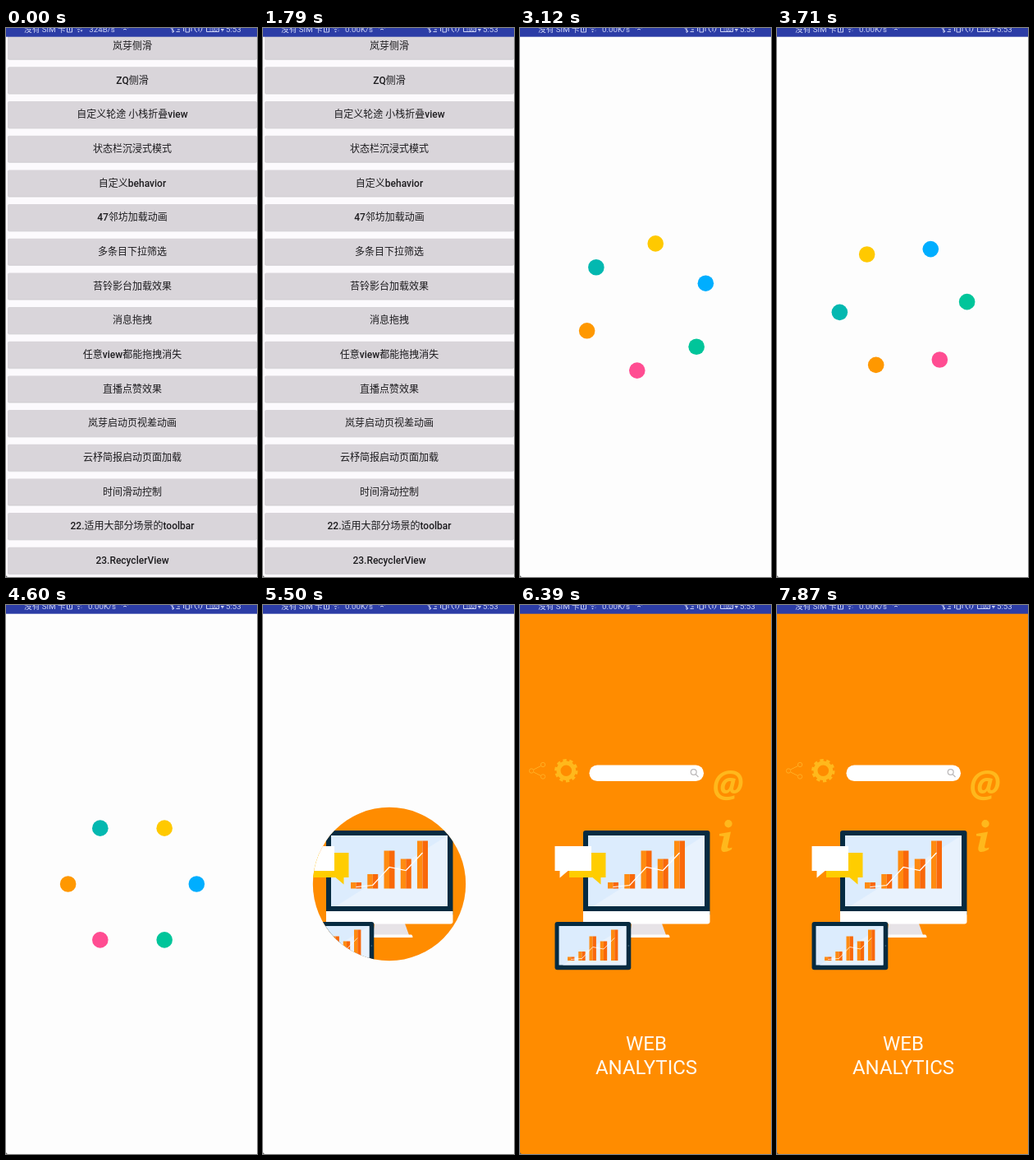
These frames come from a looping animation (306x667 px, 7970 ms). An HTML page:

```html
<!DOCTYPE html>
<html lang="zh-CN">
<head>
<meta charset="utf-8">
<title>Splash loader</title>
<style>
  html, body { margin: 0; width: 100%; height: 100%; overflow: hidden; background: #fcfafd; }
  svg { display: block; width: 306px; height: 667px; }
  text { font-family: Roboto, "Noto Sans CJK SC", "Noto Sans CJK", sans-serif; }
  #list text { font-size: 12px; font-weight: 500; fill: #1d1c1f; text-anchor: middle; }
  #status text { font-size: 9.7px; fill: #ccd2f4; }
  .title { font-size: 24px; fill: #fffaf0; text-anchor: middle; }
</style>
</head>
<body>
<svg viewBox="0 0 306 667">
  <defs>
    <clipPath id="hole"><circle id="holeCircle" cx="154" cy="339" r="0"/></clipPath>
  </defs>
  <rect width="306" height="667" fill="#fcfafd"/>
  <g id="list"></g>

  <g id="page">
    <rect y="10" width="306" height="657" fill="#fdfdfd"/>
    <g id="dots"></g>
    <g id="splash" clip-path="url(#hole)">
      <rect width="306" height="667" fill="#ff8c00"/>
      <g fill="none" stroke="#ffad22" stroke-width="1">
        <path d="M16.5 200L25.5 195.5M16.5 203L25.5 207.5"/>
        <circle cx="28" cy="194" r="2.7"/><circle cx="14" cy="201.5" r="2.7"/><circle cx="28" cy="208.5" r="2.7"/>
      </g>
      <g fill="none" stroke="#ffb81c">
        <circle cx="56.3" cy="201.2" r="9.3" stroke-width="5"/>
        <circle cx="56.3" cy="201.2" r="12.6" stroke-width="3.2" pathLength="20" stroke-dasharray="1.1 .9"/>
      </g>
      <rect x="84.5" y="194.5" width="139.5" height="19.5" rx="9.7" fill="#fff"/>
      <g fill="none" stroke="#bdbabb" stroke-width="1.3">
        <circle cx="211.7" cy="203" r="3.4"/><path d="M214.2 205.6L217.5 209"/>
      </g>
      <g fill="#ffb81c">
        <text x="253" y="233" text-anchor="middle" style="font:italic bold 44px 'Open Sans',sans-serif">@</text>
        <circle cx="254" cy="265.8" r="4.7"/>
        <path d="M243 278L257 275.5L253 294Q253 296.5 258.5 294.5L258 297Q252 300.5 248 300Q244.5 299 245.5 294L248.5 281L243 280.5Z"/>
      </g>

      <path d="M136 387H173L178 401H134Z" fill="#e7e3e7"/>
      <path d="M126 400.5H181Q182.500 401 182.500 404H126Z" fill="#fff"/>
      <rect x="77" y="274" width="154.500" height="104" rx="3" fill="#052b41"/>
      <path d="M77 372H231.500V384.500Q231.500 387.500 228.500 387.500H80Q77 387.500 77 384.500Z" fill="#fff"/>
      <rect x="83" y="280" width="142" height="86" fill="#dcecfd"/>
      <path d="M225 280V366H89Z" fill="#e8f2fd"/>
      <g id="bigChart"></g>

      <path d="M60 301H104.500V331H98.500V339.500L88.500 331H60Z" fill="#ffcd00"/>
      <path d="M42.500 293H87V323H58.500L48.500 331.500V323H42.500Z" fill="#fff"/>

      <rect x="42.500" y="385" width="92.800" height="58.300" rx="3" fill="#052b41"/>
      <rect x="47.500" y="390" width="82" height="47.500" fill="#dcecfd"/>
      <path d="M129.500 390V437.500H52Z" fill="#e8f2fd"/>
      <circle cx="132.400" cy="414" r="1" fill="#31536a"/>
      <g id="smallChart"></g>

      <text class="title" x="154" y="541">WEB</text>
      <text class="title" x="154" y="570">ANALYTICS</text>
    </g>
  </g>

  <g id="status">
    <rect width="306" height="10.700" fill="#2c3da6"/>
    <text x="22" y="5">没有 SIM 卡</text>
    <text id="speed" x="117" y="5" text-anchor="middle">324B/s</text>
    <text x="268" y="5">5:53</text>
    <g fill="none" stroke="#ccd2f4" stroke-width="1">
      <path d="M74.500 0V5H80.500V0M77.500 0V3.500"/>
      <path d="M85.500 0Q88.500 -2 91.500 0M87 2Q88.500 .8 90 2"/>
      <path d="M141 0Q145 -3 149 0M143 2Q145 .5 147 2"/>
      <path d="M200.500 0L205 4L203 5.500V-1M207.500 4.500H212M209 2H212"/>
      <path d="M216.500 0V4M219 0V5H223.500V0M226 0V4"/>
      <path d="M230 0Q230 4 233 5M235 0V4M239 0Q239 4 236.500 5"/>
      <path d="M244.500 0V4.500H259.500V0"/>
    </g>
    <text x="247" y="3.500" style="font-size:6.500px">100</text>
    <path d="M262 1H266L263.500 5V2.500H262Z" fill="#ccd2f4"/>
    <circle cx="88.500" cy="4.300" r=".9" fill="#ccd2f4"/>
    <path id="traffic" d="M90.500 2.500H93.500L92 4.800Z" fill="#ccd2f4"/>
  </g>
  <path d="M0 664.800Q.3 666.700 2.200 667H0Z" fill="#555"/>
</svg>

<script>
const LOOP = 7970;
const OPEN = 2680, STEP = 148.45;
const SPIN_START = 2555, SPIN = 671;       // three eased turns
const MERGE_START = SPIN_START + 3 * SPIN, MERGE = 697;
const EXPAND_START = MERGE_START + MERGE, EXPAND = 700;
const CX = 154, CY = 339, ORBIT = 77.9, REACH = 368;

const labels = [
  '岚芽侧滑', 'ZQ侧滑', '自定义轮途 小栈折叠view', '状态栏沉浸式模式',
  '自定义behavior', '47邻坊加载动画', '多条目下拉筛选', '苔铃影台加载效果',
  '消息拖拽', '任意view都能拖拽消失', '直播点赞效果', '岚芽启动页视差动画',
  '云杼简报启动页面加载', '时间滑动控制', '22.适用大部分场景的toolbar', '23.RecyclerView'
];
const PRESSED = 12;
const colors = ['#00aeff', '#00c59a', '#ff4d92', '#ff9800', '#03b8b0', '#ffc900'];

const $ = id => document.getElementById(id);
const clamp = v => Math.min(1, Math.max(0, v));
const ease = p => 0.5 - 0.5 * Math.cos(Math.PI * p);

function add(parent, tag, attrs, text) {
  const el = document.createElementNS('http://www.w3.org/2000/svg', tag);
  for (const k in attrs) el.setAttribute(k, attrs[k]);
  if (text) el.textContent = text;
  parent.appendChild(el);
  return el;
}

const buttons = labels.map((label, i) => {
  const y = 21.7 + i * 41.67;
  const box = { x: 2, width: 304, height: 32, rx: 2 };
  add($('list'), 'rect', { ...box, y: y - 14.6, fill: '#c9c6cb', opacity: 0.55 });
  add($('list'), 'rect', { ...box, y: y - 15.5, fill: '#c3c0c5', opacity: 0.6 });
  const face = add($('list'), 'rect', { ...box, y: y - 16, fill: '#d9d5da' });
  add($('list'), 'text', { x: 154, y: y + 4.3 }, label);
  return face;
});

function chart(group, x, gap, width, base, tops, line) {
  tops.forEach((top, i) => {
    const left = x + i * gap, half = width / 2, height = base - top;
    add(group, 'rect', { x: left, y: top, width: half, height, fill: '#ff8b10' });
    add(group, 'rect', { x: left + half, y: top, width: half, height, fill: '#f9680a' });
  });
  const points = line.map((y, i) => `${x + half(width) + i * gap},${y}`).join(' ');
  add(group, 'polyline', { points, fill: 'none', stroke: '#fff', 'stroke-width': width / 11 });
}
function half(v) { return v / 2; }

chart($('bigChart'), 107, 20.25, 13, 344.5, [337, 327, 298.5, 308.5, 286.5], [342.5, 340.5, 318.5, 322.5, 301]);
chart($('smallChart'), 58, 13.25, 8.4, 432, [427.5, 421, 402.5, 408.5, 394.5], [430.5, 429.5, 415.5, 418, 404.5]);

const dots = colors.map(fill => add($('dots'), 'circle', { r: 9.8, fill }));

// Time of the latest refresh, on a 10 ms grid.
function snap(t) {
  const k = Math.ceil((Math.floor(t / 10) * 10 + 10 - OPEN) / STEP) - 1;
  return Math.floor((OPEN + k * STEP) / 10) * 10;
}

function draw(t) {
  const open = t >= OPEN;
  $('speed').textContent = t < 750 ? '324B/s' : '0.00K/s';
  $('traffic').setAttribute('opacity', t < 1790 ? 1 : 0.25);
  $('page').style.display = open ? '' : 'none';
  buttons[PRESSED].setAttribute('fill', open ? '#bdbbc0' : '#d9d5da');
  $('list').setAttribute('transform', `translate(${open ? -70.5 : 0} 0)`);
  if (!open) return;

  const now = snap(t);
  $('page').setAttribute('transform', `translate(${now < OPEN + 100 ? 25 : 0} 0)`);

  const turns = Math.min(3, (now - SPIN_START) / SPIN);
  const spin = 2 * Math.PI * ease(turns % 1);
  const m = clamp((now - MERGE_START) / MERGE);
  const radius = ORBIT * (1 + m * m * (3 - 4 * m));   // anticipate, then collapse
  dots.forEach((dot, i) => {
    const a = spin + i * Math.PI / 3;
    dot.setAttribute('cx', CX + radius * Math.cos(a));
    dot.setAttribute('cy', CY + radius * Math.sin(a));
  });
  $('dots').style.display = m < 1 ? '' : 'none';

  const e = clamp((now - EXPAND_START) / EXPAND);
  $('splash').style.display = e > 0 ? '' : 'none';
  $('holeCircle').setAttribute('r', REACH * ease(e));
}

const begin = performance.now();
function tick() {
  draw((performance.now() - begin) % LOOP);
  requestAnimationFrame(tick);
}
tick();
</script>
</body>
</html>
```
